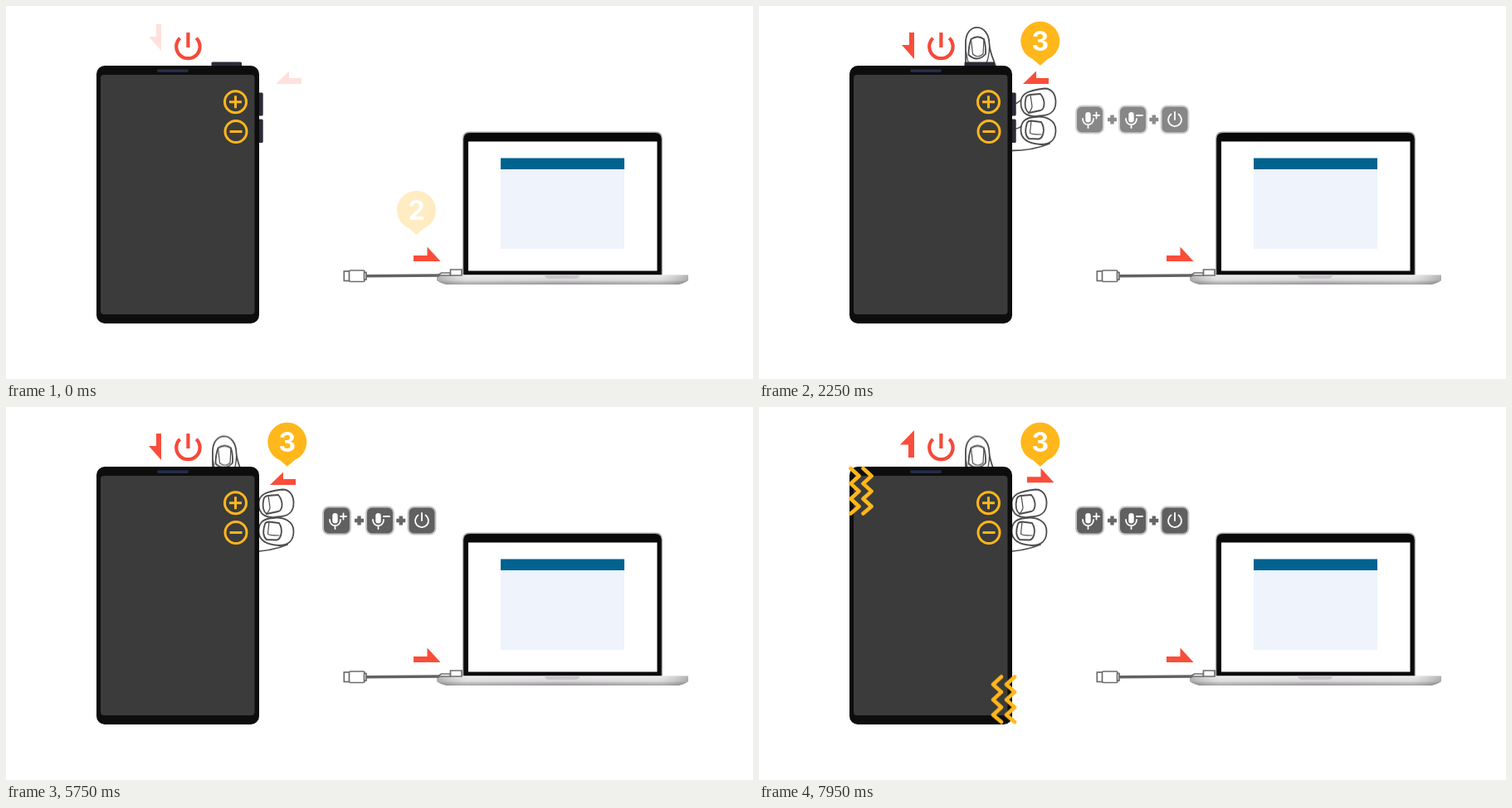
An HTML page without scripts that plays this animation: 900 px wide and 450 px high, repeating every 8 s.

```html
<!DOCTYPE html>
<html lang="en">
<head>
<meta charset="utf-8">
<title>Hold the buttons</title>
<style>
html, body { margin: 0; width: 100%; height: 100%; overflow: hidden; background: #fff; }
svg { display: block; width: 900px; height: 450px; }
.red { fill: #fa4d3a; }
.yellow { fill: #ffb71b; }
.ring { fill: none; stroke: #ffb71b; stroke-width: 3; }
.button { fill: #2c2a35; }
.skin { fill: #fff; stroke: #4c4c4e; stroke-width: 1.8; stroke-linejoin: round; stroke-linecap: round; }
.cable { fill: #fff; stroke: #6d6d6d; stroke-width: 1.7; }
.zigzag { fill: none; stroke: #ffb71b; stroke-width: 4.6; stroke-linecap: round; stroke-linejoin: round; }
.digit { font: 700 32px Inter, "Open Sans", sans-serif; fill: #fff; text-anchor: middle; }
.cap { fill: #606060; stroke: #c6c6c6; stroke-width: 2; }
.glyph { fill: none; stroke: #fff; stroke-width: 1.8; stroke-linecap: round; }

.step2, .step3, .in, .side, .down, .hand, .thumb, .fingers, .keys, .buzz, .out, .up, .right {
  animation: 8s linear infinite;
}
.step2 { animation-name: step2; }
.step3 { animation-name: step3; }
.in { animation-name: in; }
.down { animation-name: down; }
.side { animation-name: side; }
.hand { animation-name: hand; }
.thumb { animation-name: thumb; }
.fingers { animation-name: fingers; }
.keys { animation-name: keys; }
.buzz { animation-name: buzz; }
.out { animation-name: out; }
.up { animation-name: up; }
.right { animation-name: right; }

@keyframes step2 { 0% { opacity: .26 } 1.6%, 100% { opacity: 0 } }
@keyframes step3 { 0%, 4.4% { opacity: 0 } 10.6%, 100% { opacity: 1 } }
@keyframes in { 0% { opacity: .17 } 5.2%, 75% { opacity: 1 } 81.25%, 100% { opacity: 0 } }
@keyframes down { 0% { transform: translateY(-10px) } 5.2%, 100% { transform: none } }
@keyframes side { 0% { transform: translateX(7px) } 5.2%, 100% { transform: none } }
@keyframes hand { 0%, 10.6% { opacity: 0 } 16.25%, 100% { opacity: 1 } }
@keyframes thumb {
  0%, 31.8% { transform: none }
  31.87% { transform: translateY(.8px) }
  36.25% { transform: translateY(.8px); animation-timing-function: ease-out }
  40.6%, 100% { transform: translateY(9.5px) }
}
@keyframes fingers {
  0%, 31.8% { transform: none }
  31.87% { transform: translateX(-.8px) }
  36.25% { transform: translateX(-.8px); animation-timing-function: ease-out }
  40.6%, 100% { transform: translateX(-11px) }
}
@keyframes keys { 0%, 26.25% { opacity: 0 } 28.75%, 100% { opacity: 1 } }
@keyframes buzz { 0%, 75% { opacity: 0 } 81.25%, 100% { opacity: 1 } }
@keyframes out { 0%, 96.87% { opacity: 0 } 99.37%, 100% { opacity: 1 } }
@keyframes up { 0%, 96.87% { transform: translateY(5px) } 99.37%, 100% { transform: none } }
@keyframes right { 0%, 96.87% { transform: translateX(-5px) } 99.37%, 100% { transform: none } }
</style>
</head>
<body>
<svg viewBox="0 0 900 450" xmlns="http://www.w3.org/2000/svg">
  <defs>
    <path id="arrow" d="M0 10.5H16.5V0L32.5 17.5H0Z"/>
    <path id="pin" d="M0-23.5A23.5 23.5 0 0 1 9 21.7L0 29.5L-9 21.7A23.5 23.5 0 0 1 0-23.5Z"/>
    <path id="zig" d="M0 0L10 9.2L0 18.4L10 27.6L0 36.8L10 46L0 54.5"/>
    <g id="mic">
      <rect x="-3.2" y="-9" width="6.4" height="12.5" rx="3.2" fill="#fff"/>
      <path class="glyph" d="M-6.5-1C-6.5 8.5 6.5 8.5 6.5-1M0 6.5V10"/>
    </g>
    <path id="plus" d="M-5.5 0H5.5M0-5.5V5.5" stroke="#666" stroke-width="4.4"/>
    <rect id="key" class="cap" x="-16.5" y="-16.5" width="33" height="33" rx="7"/>
    <linearGradient id="base" x2="0" y2="1">
      <stop offset="0" stop-color="#e9e7e9"/>
      <stop offset=".55" stop-color="#d3d1d3"/>
      <stop offset=".75" stop-color="#a9a7a9"/>
      <stop offset="1" stop-color="#8a888a"/>
    </linearGradient>
    <linearGradient id="shade">
      <stop offset="0" stop-color="#777" stop-opacity=".45"/>
      <stop offset=".12" stop-color="#fff" stop-opacity=".25"/>
      <stop offset=".5" stop-color="#fff" stop-opacity=".1"/>
      <stop offset=".88" stop-color="#fff" stop-opacity=".25"/>
      <stop offset="1" stop-color="#777" stop-opacity=".45"/>
    </linearGradient>
  </defs>

  <!-- hand and side buttons, tucked behind the tablet -->
  <g class="thumb">
    <g class="hand skin">
      <path d="M249 84V44C249 19.500 277 19.500 277.500 46C278 55 281 61 285 72V84Z"/>
      <path d="M249.500 55C250.500 61 251 66 253 70M277.500 50C277.500 58 276 64 274 69" fill="none" stroke-width="1.300"/>
      <path d="M255.500 40Q263.500 34.500 271 40Q273.500 48 273 58Q263 68.500 252.500 59Q252.500 48 255.500 40Z"/>
      <path d="M255.500 40L257.500 58Q263.500 63.500 270 58L271 40" fill="none" stroke-width="1.200"/>
    </g>
    <rect class="button" x="247.500" y="67.500" width="36.500" height="8" rx="1.500"/>
  </g>
  <g class="fingers">
    <g class="hand skin">
      <path d="M290 174C318 176 336 172 350 166" fill="none"/>
      <path d="M300 120Q309 120 316 113M300 148Q310 150 316 145" fill="none" stroke-width="1.400"/>
      <path d="M315.500 116C316 105 325 102 344 99.500C354 99.500 357.500 108 357.500 116C357.500 127 350 132.500 338 132.500C326 134.500 315 131 315.500 116Z"/>
      <path d="M321.500 111Q322.500 107.500 327 107L339 106Q344 112 343.500 119Q343 125 339 126L325 129Q318.500 124 321.500 111Z"/>
      <path d="M327 107L329 121Q329 124 325 129" fill="none" stroke-width="1.200"/>
      <path d="M315.500 150C315.500 140 320 135 332 134C346 132 357.500 138 357.500 150C357.500 162 350 167 340 167C324 166 315.500 161 315.500 150Z"/>
      <path d="M323 141Q324 138.500 328 138.500L340 140Q344 146 342.500 153Q341.500 159.500 337 160.500L325 160Q318.500 155 323 141Z"/>
      <path d="M328 138.500L326.500 153Q327 155 340 155" fill="none" stroke-width="1.200"/>
    </g>
    <rect class="button" x="300" y="104.500" width="9.700" height="28" rx="1.500"/>
    <rect class="button" x="300" y="136.500" width="9.700" height="28.500" rx="1.500"/>
  </g>

  <!-- tablet -->
  <rect x="109" y="72" width="196" height="311" rx="10" fill="#0d0d0e"/>
  <rect x="114" y="83" width="185.500" height="289" rx="4" fill="#3b3b3b"/>
  <rect x="182" y="76.300" width="38" height="3.600" rx="1.800" fill="#232c48"/>
  <g class="ring">
    <circle cx="276.500" cy="115.700" r="13"/>
    <path d="M269 115.700H284M276.500 108.200V123.200"/>
    <circle cx="277" cy="151.500" r="13"/>
    <path d="M269.500 151.500H284.500"/>
  </g>
  <path d="M209.600 38.700A14.200 14.200 0 1 0 229.200 38.700M219.400 32V50" fill="none" stroke="#f54a3b" stroke-width="4.200"/>

  <g class="buzz zigzag">
    <use href="#zig" x="110.500" y="74"/>
    <use href="#zig" x="125.500" y="74"/>
    <g transform="matrix(-1 0 0 1 308 325.500)">
      <use href="#zig"/>
      <use href="#zig" x="16"/>
    </g>
  </g>

  <!-- laptop -->
  <path d="M550 325V160Q550 151.500 558.500 151.500H782.500Q791 151.500 791 160V325Z" fill="#a5a5a7"/>
  <path d="M551.300 325V160.500Q551.300 153 559 153H782Q789.700 153 789.700 160.500V325Z" fill="#0a0a0a"/>
  <rect x="557" y="163.500" width="227.500" height="156" fill="#fff"/>
  <rect x="596" y="196" width="149" height="97" fill="#eef3fc"/>
  <rect x="596" y="183.500" width="149" height="13.500" fill="#00628f"/>
  <g id="deck">
    <path id="slab" d="M519 324.500H822V331Q815 336 806 336H535Q526 336 519 331Z" fill="url(#base)"/>
    <use href="#slab" style="fill:url(#shade)"/>
    <path d="M519 324.500H822V331Q815 336 806 336H535Q526 336 519 331Z" fill="url(#shade)"/>
    <path d="M649 324.500H691Q690 329 686 329H654Q650 329 649 324.500Z" fill="#c9c7c9"/>
  </g>

  <!-- cable -->
  <g class="cable">
    <path d="M434 325.700L522 325" stroke="#626262" stroke-width="3.400"/>
    <rect x="407.300" y="320" width="6.500" height="11.500"/>
    <rect x="413.500" y="319" width="18.500" height="13.500" rx="1.500"/>
    <rect x="431.500" y="321.500" width="2.500" height="8.500"/>
    <path d="M520 325L524.500 322H535.500V325Z"/>
    <path d="M535.500 325V318H549V325Z"/>
  </g>
  <use class="red" href="#arrow" x="491" y="290.500"/>

  <!-- step badges -->
  <g class="step2">
    <use class="yellow" href="#pin" x="494.500" y="246.500"/>
    <text class="digit" x="494.500" y="258">2</text>
  </g>
  <g class="step3">
    <use class="yellow" href="#pin" x="338.800" y="42.300"/>
    <text class="digit" x="338.800" y="54">3</text>
  </g>

  <!-- press arrows -->
  <g class="in red">
    <path class="down" d="M187 32V64L172 47H181V32Z"/>
    <path class="side" d="M349 94H318L334 78.500V87H349Z"/>
  </g>

  <!-- release arrows -->
  <g class="out red">
    <path class="up" d="M187 28V61H180V45.500H170Z"/>
    <g class="right"><use href="#arrow" x="323" y="73.800"/></g>
  </g>

  <!-- key combination -->
  <g class="keys">
    <use href="#key" x="398.500" y="137"/>
    <use href="#key" x="450.500" y="137"/>
    <use href="#key" x="501" y="137"/>
    <use href="#plus" x="425.500" y="137"/>
    <use href="#plus" x="475.800" y="137"/>
    <use href="#mic" x="396.500" y="137"/>
    <use href="#mic" x="448.500" y="137"/>
    <path class="glyph" d="M403 132H410M406.500 128.500V135.500M455 132H462"/>
    <path class="glyph" d="M496.500 130.500A8 8 0 1 0 505.500 130.500M501 128V137"/>
  </g>
</svg>
</body>
</html>
```
